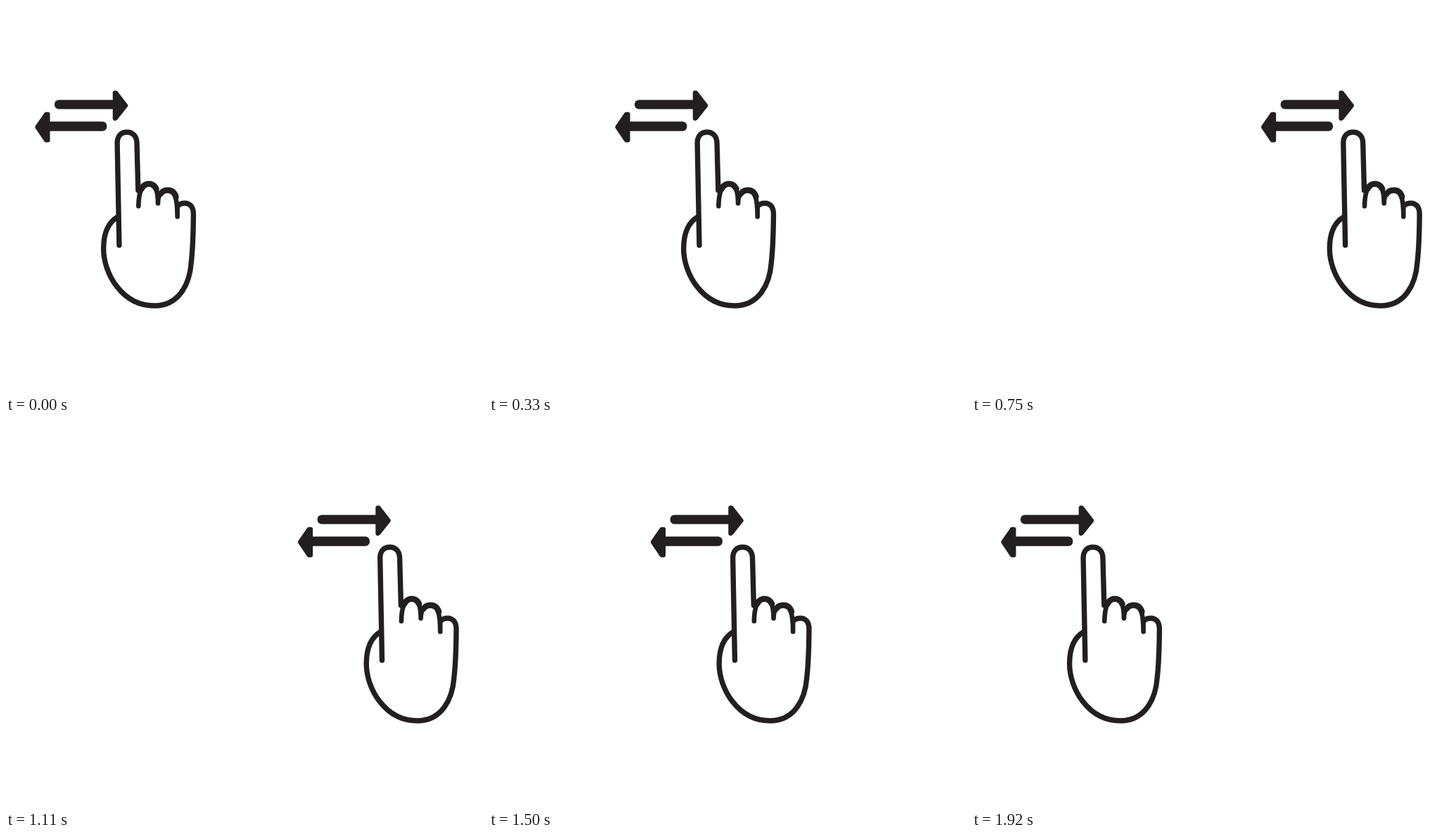
Animation of 678 by 550 pixels, one loop 2.22 s. Source, as an HTML page without scripts:

```html
<!DOCTYPE html>
<html lang="en">
<head>
<meta charset="utf-8">
<title>Swipe gesture</title>
<style>
  /* --n counts 30 ms ticks; position is a smoothstep out and back */
  @property --n {
    syntax: "<number>";
    inherits: false;
    initial-value: 0;
  }
  html, body {
    margin: 0;
    width: 100%;
    height: 100%;
    overflow: hidden;
    background: #fff;
  }
  svg {
    display: block;
    width: 678px;
    height: 550px;
  }
  .swipe {
    --out: clamp(0, (var(--n) + .1) / 27, 1);
    --back: clamp(0, (var(--n) - 36) / 28.1, 1);
    --go: (var(--out) * var(--out) * (3 - 2 * var(--out)));
    --return: (var(--back) * var(--back) * (3 - 2 * var(--back)));
    transform: translateX(calc(375px * (var(--go) - var(--return))));
    animation: tick 2220ms steps(74) -1ms infinite;
  }
  @keyframes tick {
    from { --n: 0; }
    to { --n: 74; }
  }
  .arrow {
    fill: #231f20;
    stroke: #231f20;
    stroke-width: 6;
    stroke-linejoin: round;
  }
  .arrow rect { stroke: none; }
  .hand {
    fill: none;
    stroke: #231f20;
    stroke-width: 7.4;
    stroke-linecap: round;
    stroke-linejoin: round;
  }
  .hand .thick { stroke-width: 8.4; }
  .hand .thin { stroke-width: 6.6; }
</style>
</head>
<body>
<svg viewBox="0 0 678 550">
  <g class="swipe">
    <g class="arrow">
      <rect x="69" y="133.6" width="90" height="12.8" rx="6"/>
      <path d="M154.7 123.2L156 123.2L170.3 141.5L156 159.5L154.7 160Z"/>
      <rect x="54" y="164.3" width="89.3" height="13.4" rx="6"/>
      <path d="M59.5 153.7L57 153.7L44.3 172L57 190.8L59.5 190.8Z"/>
    </g>
    <g class="hand">
      <path d="M160.9 340L158.1 195C158.1 184 164 179.2 172 179.2C180 179.2 185.8 185 186 195L187.8 262"/>
      <path class="thin" d="M188.3 284.5C188.6 266 192 253 203 253C212 253 215.8 261 216 280.5C216 268 222 262 229.8 262C239 262 243.6 270 243.6 299.5V285"/>
      <path class="thick" d="M192.5 260C195 255 198.5 252.7 203 252.7C208 252.7 211.5 255.5 213.5 260"/>
      <path class="thick" d="M219.5 267C222 263.5 225 261.8 229.8 261.8C235 261.8 239.5 265 241.5 271"/>
      <path d="M244.5 284C247 281 250 280.2 254 280.2C262 280.2 266.4 286 266.4 296C266.2 322 265.6 344 263.2 365C261 395 246 426 211 426C165 426 138.6 380 138.6 345C138.6 322 146 307 159 299.5"/>
    </g>
  </g>
</svg>
</body>
</html>
```
